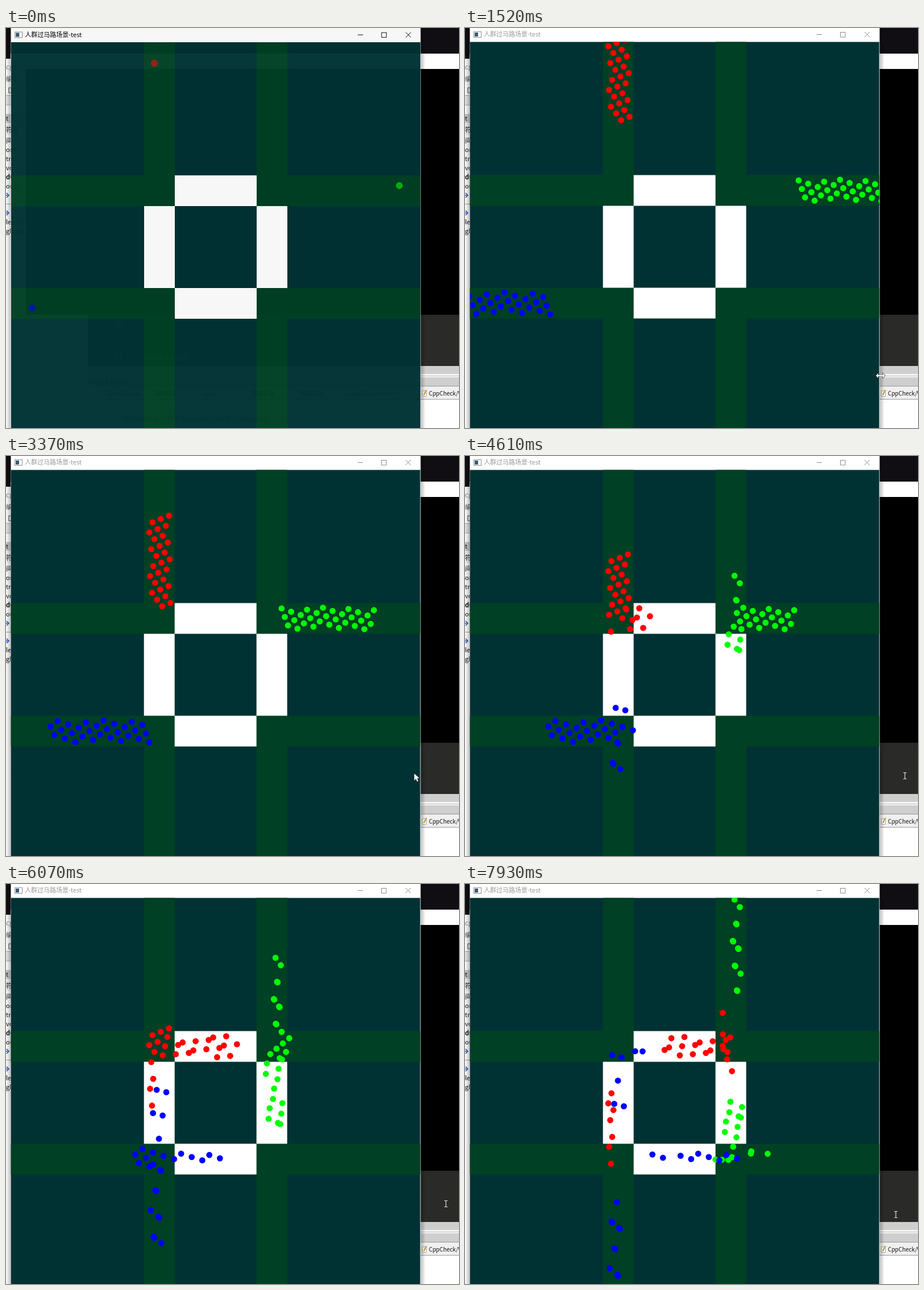
Animation of 797x703 px, one loop 8 s. Source, as an HTML page:

```html
<!DOCTYPE html>
<html lang="zh">
<head>
<meta charset="utf-8">
<title>人群过马路场景-test</title>
<style>
html, body { margin: 0; width: 100%; height: 100%; overflow: hidden; background: #fff; }
svg { display: block; width: 797px; height: 703px; }
text { font-family: "Noto Sans CJK SC", "Noto Sans CJK JP", "Noto Sans", sans-serif; white-space: pre; }
</style>
</head>
<body>
<svg id="stage" viewBox="0 0 797 703" xmlns="http://www.w3.org/2000/svg">
  <defs>
    <clipPath id="view"><rect x="9" y="24" width="720" height="679"/></clipPath>
    <linearGradient id="shade"><stop stop-opacity=".28"/><stop offset="1" stop-opacity="0"/></linearGradient>
  </defs>
  <g id="desktop"></g>
  <rect x="729" width="9" height="703" fill="url(#shade)"/>
  <rect x="-9" width="9" height="703" fill="url(#shade)" transform="scale(-1 1)"/>
  <g id="win">
    <rect x="8.5" width="721" height="703" fill="#fff"/>
    <g id="frame">
      <rect x="15.5" y="6.5" width="13" height="10" fill="#fff" stroke="#8a8f96"/>
      <rect x="17" y="8" width="6" height="7" fill="#3c5a6e"/>
      <text id="title" x="33" y="15" font-size="11">人群过马路场景-test</text>
      <path id="buttons" d="M618.5 11.5h9.5M660.5 7.5h8.5v8.5h-8.5zM703 7l9 9M712 7l-9 9" fill="none"/>
      <g id="town"></g>
    </g>
    <g id="crowd" clip-path="url(#view)"></g>
  </g>
  <g id="cursor"></g>
</svg>
<script>
const $ = id => document.getElementById(id);
const mix = (a, b, u) => a + (b - a) * u;
const frac = v => v - Math.floor(v);

function add(parent, tag, attrs, text) {
  const el = document.createElementNS("http://www.w3.org/2000/svg", tag);
  for (const k in attrs) el.setAttribute(k, attrs[k]);
  if (text) el.textContent = text;
  parent.appendChild(el);
  return el;
}
const box = (parent, x, y, width, height, fill) => add(parent, "rect", { x, y, width, height, fill });
const label = (x, y, text, fill = "#111", size = 11, weight = 400) =>
  add($("desktop"), "text", { x, y, fill, "font-size": size, "font-weight": weight }, text);

function drawDesktop() {
  const d = $("desktop");
  box(d, 0, 0, 797, 45, "#100e12");
  box(d, 0, 45, 8, 9, "#100e12");
  box(d, 0, 118, 35, 18, "#e4e4e4");
  box(d, 0, 151, 35, 16, "#c9c9c9");
  box(d, 0, 168, 35, 20, "#f0f0f0");
  box(d, 35, 72, 762, 432, "#000");
  box(d, 145, 504, 652, 90, "#2a2a28");
  box(d, 145, 594, 652, 35, "#cecece");
  box(d, 145, 608, 652, 6, "#f6f6f6");
  box(d, 145, 611, 652, 1, "#bbb");
  box(d, 145, 630, 652, 22, "#f0f0f0");
  for (const y of [118, 135]) box(d, 0, y, 35, 1, "#aaa");
  for (const y of [629, 652]) box(d, 145, y, 652, 1, "#999");
  label(0, 73, "cpp", "#888", 12);
  label(0, 94, "编辑", "#444");
  label(0, 163, "t");
  label(0, 183, "符号");
  ["间", "om", "tre", "vo", "dC", "oups", "", "", "", "leader", "global"].forEach((s, i) =>
    label(0, 202 + i * 15.9, s, "#111", 11, s === "dC" ? 700 : 400));
  for (const y of [294, 325])
    add(d, "path", { d: `M0 ${y}h3M1 ${y - 4}l4 4-4 4`, stroke: "#2b45c8", fill: "none", "stroke-width": 1.5 });
  add(d, "path", { d: "M0 309.5h9", stroke: "#999" });
  add(d, "path", { d: "M5 105h4v9h-4z", stroke: "#333", fill: "none" });
  for (let i = 0; i < 4; i++) label(190, 525 + i * 19.5, String(18 + i), "#999", 14);
  label(246, 584, "cout << ball", "#eee", 14);
  label(147, 626, "Logs & others");
  ["Code::Blocks", "搜索结果", "Cccc", "构建记录", "构建信息", "CppCheck/Vera++"].forEach((s, i) =>
    label(177 + i * 85, 646, s, "#111", 10));
  label(744, 646, "CppCheck/Vera++", "#111", 10);
  label(150, 691, "-------------- 运行: Debug in 测试 (compiler: GNU GCC Compiler)---------------");
  add(d, "path", { d: "M732.5 637.5h7v10h-7z", fill: "#fff", stroke: "#aaa" });
  add(d, "path", { d: "M735 645l5-9", stroke: "#c79a2b", "stroke-width": 2 });
}

function drawTown() {
  const g = $("town"), left = 8.7, top = 24.5, road = 54, block = 144;
  const near = 234, far = near + road + block;
  const part = (x, y, w, h, fill) => box(g, left + x, top + y, w, h, fill);
  part(0, 0, 720, 720, "#003233");
  for (const p of [near, far]) {
    part(p, 0, road, 720, "#004025");
    part(0, p, 720, road, "#004025");
  }
  for (const p of [near, far]) {
    part(near + road, p, block, road, "#fff");
    part(p, near + road, road, block, "#fff");
  }
}

// A crowd walks along one axis (0 = x, 1 = y) in a column led by `head`.
// A route lists where each leg ends, as a place or a band; legs alternate axes.
const crowds = [
  { fill: "#f00", spawn: [261, 62], axis: 1, dir: 1, head: 222, gap: 5.9, size: 28,
    lanes: [252, 290], phase: 0.6, step: 0.382,
    route: (u, k) => u < 0.26 ? [900]
      : k % 3 ? [[266, 305], [447, 473], 900] : [[266, 305], [452, 459], -200] },
  { fill: "#0f0", spawn: [692, 277], axis: 0, dir: -1, head: 527, gap: 5.6, size: 30,
    lanes: [266, 305], phase: 0.05, step: 0.382,
    route: (u, k) => u < 0.42 ? [[471, 487], -200]
      : k % 3 === 1 ? [[453, 488], [484, 496], 0] : [[453, 488], [464, 478], 900] },
  { fill: "#00f", spawn: [46, 492], axis: 0, dir: 1, head: 210, gap: 6.2, size: 29,
    lanes: [464, 504], phase: 0.98, step: 0.618,
    route: u => u > 0.55 ? [[252, 275], 900]
      : u < 0.22 ? [[257, 286], [288, 300], 900] : [900] }
];

const LOOP = 8000, BURST = 270, MARCH = 1100, SPEED = 0.055, HEAD_AT = 2600;

// Point at distance s along a polyline.
function along(path, s) {
  for (let i = 1; i < path.length; i++) {
    const [a, b] = [path[i - 1], path[i]];
    const len = Math.hypot(b[0] - a[0], b[1] - a[1]);
    if (s <= len || i === path.length - 1) return [mix(a[0], b[0], s / len), mix(a[1], b[1], s / len)];
    s -= len;
  }
}

function makeWalker(c, k) {
  const u = frac(c.phase + c.step * k);
  const place = [0, 0];
  place[c.axis] = c.head - c.dir * (k * c.gap + SPEED * (HEAD_AT - MARCH));
  place[1 - c.axis] = mix(...c.lanes, u);
  const path = [[...place]];
  c.route(u, k).forEach((end, i) => {
    place[(c.axis + i) % 2] = Array.isArray(end) ? mix(...end, frac(u * (3 * i + 4))) : end;
    path.push([...place]);
  });
  const dot = add($("crowd"), "circle", { r: 5.4, fill: c.fill });
  return t => {
    const p = along(path, SPEED * Math.max(0, t - MARCH));
    const wait = 1 - Math.min(1, Math.max(0, (t - BURST) / (MARCH - BURST)));
    const [x, y] = p.map((v, i) => mix(v, c.spawn[i], wait * wait));
    dot.setAttribute("cx", x.toFixed(2));
    dot.setAttribute("cy", y.toFixed(2));
  };
}

const beam = "M-3 -5.5h2l1 1 1-1h2M0 -4.5v9M-3 5.5h2l1-1 1 1h2";
const arrows = "M-8 0l4-4v3h8v-3l4 4-4 4v-3h-8v3z";
const pointer = "M0 0v12l3-3 2 5 2-1-2-5h4z";
const mouse = [[270, 733, 718], [1520, 731, 610], [2600, 770, 613], [3370, 718, 558],
  [4460, 735, 575], [4530, 774, 562], [6230, 774, 562], [7930, 758, 581]];

function mouseAt(t) {
  const i = Math.max(1, mouse.findIndex(m => m[0] >= t));
  const [a, b] = [mouse[i - 1], mouse[i]];
  const u = Math.max(0, (t - a[0]) / (b[0] - a[0]));
  return [mix(a[1], b[1], u), mix(a[2], b[2], u)];
}

drawDesktop();
drawTown();
const walkers = crowds.flatMap(c => Array.from({ length: c.size }, (_, k) => makeWalker(c, k)));
const shape = add($("cursor"), "path", { "paint-order": "stroke", "stroke-width": 1.2 });

function drawCursor(t) {
  const [x, y] = mouseAt(Math.min(t, 7930));
  const kind = x < 725 ? "point" : x < 738 ? "wide" : y > 594 ? "tall" : "text";
  const turn = kind === "tall" ? 90 : 0;
  $("cursor").setAttribute("transform", `translate(${x.toFixed(1)} ${y.toFixed(1)}) rotate(${turn})`);
  $("cursor").setAttribute("visibility", t < BURST ? "hidden" : "visible");
  shape.setAttribute("d", { point: pointer, text: beam }[kind] || arrows);
  shape.setAttribute("fill", kind === "text" ? "none" : "#fff");
  shape.setAttribute("stroke", kind === "text" ? "#ddd" : "#222");
}

function draw(ms) {
  // The picture advances in even ticks.
  const t = ms < BURST ? ms : BURST + Math.floor((ms - 258) / 77.4) * 77.4;
  const opening = ms < 70;
  $("win").setAttribute("opacity", opening ? 0.97 : 1);
  $("crowd").setAttribute("opacity", opening ? 0.6 : 1);
  $("title").setAttribute("fill", opening ? "#000" : "#999");
  $("buttons").setAttribute("stroke", opening ? "#111" : "#888");
  $("frame").setAttribute("transform", opening ? "translate(.3 .5)" : "translate(0 0)");
  for (const move of walkers) move(t);
  drawCursor(t);
}

const start = performance.now();
function tick() {
  draw((performance.now() - start) % LOOP);
  requestAnimationFrame(tick);
}
draw(0);
requestAnimationFrame(tick);
</script>
</body>
</html>
```
